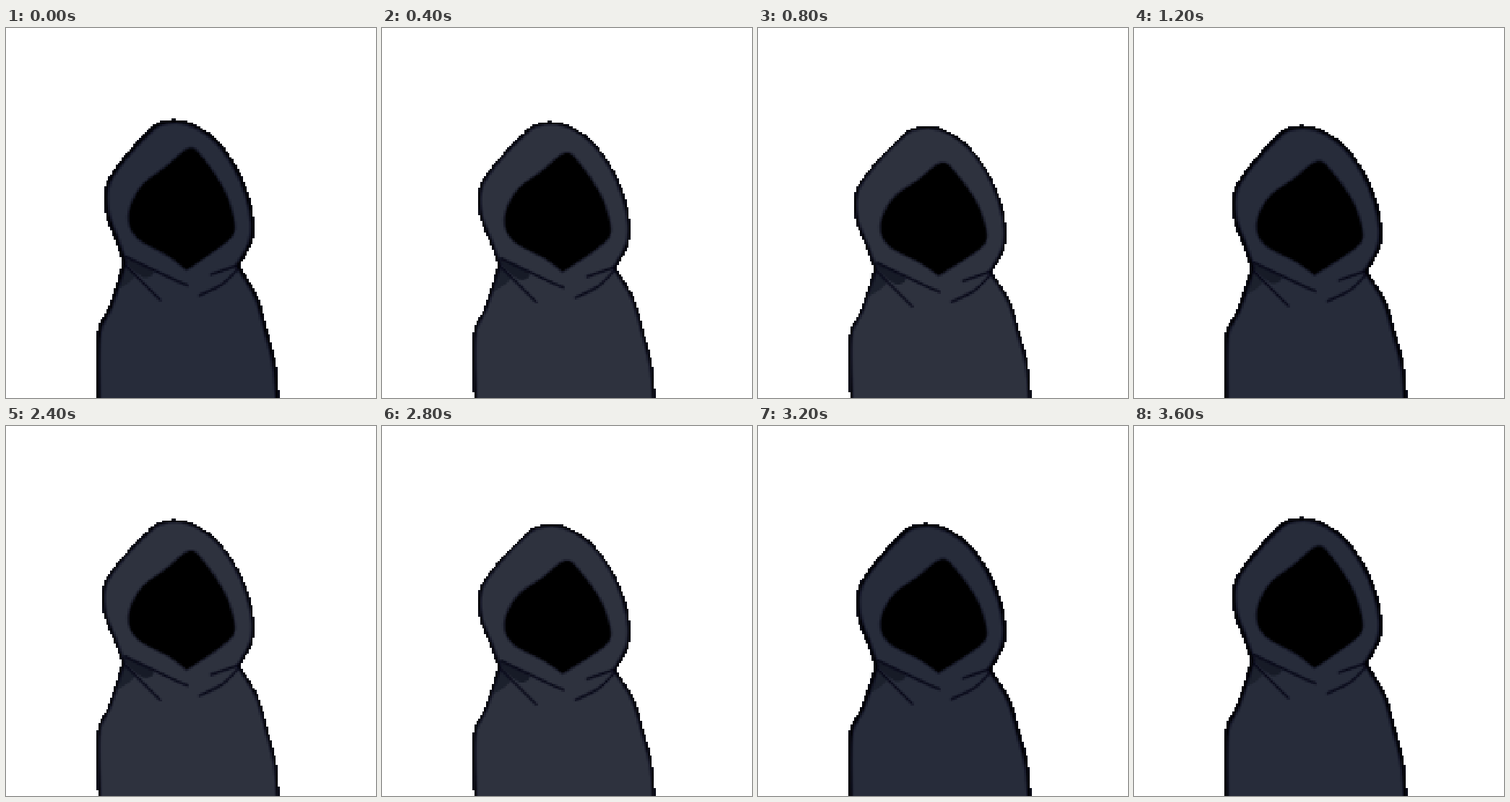
Recreate the animation shown at these times as an HTML page with a canvas. Size 512 px wide and 512 px high, loop 4000 ms.

```html
<!DOCTYPE html>
<html lang="en">
<head>
<meta charset="utf-8">
<title>Hooded figure</title>
<style>
  html, body { margin: 0; width: 100%; height: 100%; overflow: hidden; background: #fff; }
  canvas { display: block; width: 512px; height: 512px; image-rendering: pixelated; }
</style>
</head>
<body>
<canvas id="stage" width="192" height="192"></canvas>
<script>
const SIZE = 192, STEP = 400;
const ctx = document.getElementById('stage').getContext('2d', { willReadFrequently: true });
const clamp = (v, low, high) => Math.max(low, Math.min(high, v));

// Key points on a 512 unit stage; "|" marks a sharp corner between two curves.
const curves = text => text.split(' | ').map(part => part.split(' ').map(p => p.split(',').map(Number)));

const cloak = curves(
  '126,540 125,455 128,415 143,384 162,325 | ' +
  '162,325 152,295 138,255 139,215 165,176 195,144 214,130 250,129 289,152 318,190 336,232 343,270 340,298 323,329 | ' +
  '323,329 348,371 362,420 374,470 379,540');
const face = curves(
  '250,334 225,315 182,290 170,260 187,220 222,192 253,167 272,180 302,225 315,265 314,285 295,303 250,334');
const shade = curves('161,322 178,343 155,362');
const collar = curves('162,315 203,336 190,345 162,322');
const folds = ['165,316 230,347 251,356', '163,326 213,376', '268,370 300,354 323,331', '284,341 322,328'].map(curves);

// How far the hood sinks in each pose of one breath
const drops = [0, 3, 9, 8, 0];

// Smooth curves through the moved key points
function trace(parts, move) {
  ctx.beginPath();
  for (const part of parts) {
    const pts = part.map(move);
    const at = i => pts[clamp(i, 0, pts.length - 1)];
    const handle = (i, dir) => [0, 1].map(k => at(i)[k] + dir * (at(i + 1)[k] - at(i - 1)[k]) / 6);
    ctx.lineTo(...pts[0]);
    for (let i = 1; i < pts.length; i++) {
      ctx.bezierCurveTo(...handle(i - 1, 1), ...handle(i, -1), ...at(i));
    }
  }
}

function fill(color) {
  ctx.fillStyle = color;
  ctx.fill();
}

function stroke(color, width) {
  ctx.strokeStyle = color;
  ctx.lineWidth = width;
  ctx.stroke();
}

// Gives the silhouette hard, stepped edges.
function harden() {
  const image = ctx.getImageData(0, 0, SIZE, SIZE);
  for (let i = 3; i < image.data.length; i += 4) {
    image.data[i] = image.data[i] < 128 ? 0 : 255;
  }
  ctx.putImageData(image, 0, 0);
}

function draw(index) {
  const drop = drops[index];
  const soft = index === 1 || index === 2; // paler cloth, thinner outline, wider left side
  const settle = ([x, y]) => [x, y + drop];
  const squash = ([x, y]) => [x, y + drop * (2.25 - 1.35 * (y - 168) / 166)];
  const sink = ([x, y]) => {
    const bulge = soft ? 3 * clamp((200 - x) / 65, 0, 1) * clamp((400 - y) / 150, -1, 1) : 0;
    return [x - bulge, y + drop * clamp((480 - y) / 150, 0, 1)];
  };

  ctx.setTransform(1, 0, 0, 1, 0, 0);
  ctx.clearRect(0, 0, SIZE, SIZE);
  ctx.scale(SIZE / 512, SIZE / 512);
  ctx.lineJoin = ctx.lineCap = 'round';

  trace(cloak, sink);
  fill(soft ? '#2e323e' : '#272c3a');
  ctx.save();
  ctx.clip();
  trace(shade, settle);
  fill('#1c212d');
  trace(collar, settle);
  fill('#171b27');
  for (const fold of folds) {
    trace(fold, settle);
    stroke('rgba(8,9,28,.4)', 5);
    stroke('#090a18', 2.6);
  }
  trace(cloak, sink);
  stroke('rgba(8,9,28,.5)', soft ? 10 : 13);
  stroke('#020207', soft ? 5 : 8);
  ctx.restore();

  trace(face, squash);
  stroke('rgba(8,9,24,.5)', 5);
  fill('#000');
  harden();
}

let shown = -1;
function tick() {
  const index = Math.floor(performance.now() / STEP) % drops.length;
  if (index !== shown) draw(shown = index);
  requestAnimationFrame(tick);
}
tick();
</script>
</body>
</html>
```
